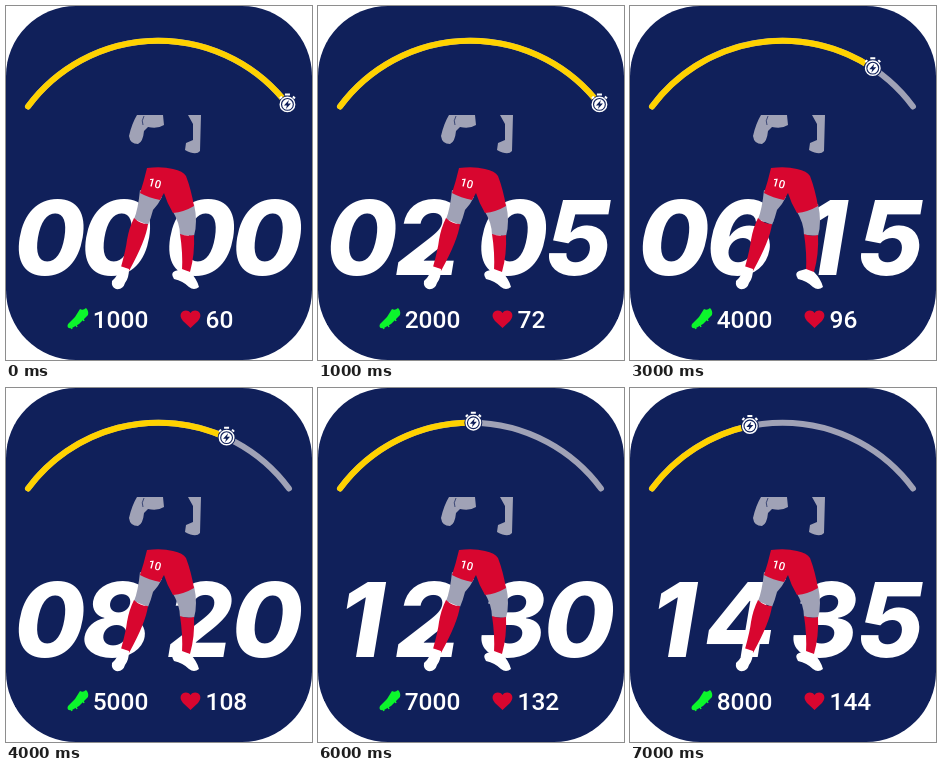
An HTML page for the animation above (8000 ms loop, 306x354 px).

```html
<!DOCTYPE html>
<html>
<head>
<meta charset="utf-8">
<style>
html, body { margin: 0; width: 100%; height: 100%; overflow: hidden; background: #fff; }
svg { display: block; width: 306px; height: 354px; }
text { font-family: Roboto, sans-serif; fill: #fff; }
.time { font: italic 800 103px Inter, sans-serif; text-anchor: middle; }
.stat { font-size: 24.5px; font-weight: 500; }
.arc { fill: none; stroke-width: 6; stroke-linecap: round; }
.skin { fill: #a0a2b6; }
.kit { fill: #d8062f; }
</style>
</head>
<body>
<svg viewBox="0 0 306 354">
  <rect width="306" height="354" rx="70" fill="#10205a"/>

  <path id="track" class="arc" stroke="#a0a2b6"/>
  <path id="level" class="arc" stroke="#ffd200"/>
  <g id="marker">
    <circle r="9" fill="#10205a"/>
    <path d="M-2.500-10H2.500M-7.500-6L-5.500-8M7.500-6L5.500-8" stroke="#fff" stroke-width="2"/>
    <circle r="7.200" fill="#10205a" stroke="#fff" stroke-width="1.500"/>
    <circle r="5.300" fill="#fff"/>
    <path d="M1.500-4.500L-3.500 1H-.5L-1.500 4.500L3.500-1H.5Z" fill="#10205a"/>
  </g>

  <g id="digits">
    <text class="time" x="43.5" y="269"/>
    <text class="time" x="110" y="269"/>
    <text class="time" x="194" y="269"/>
    <text class="time" x="261" y="269"/>
  </g>

  <g id="player">
    <path class="skin" d="M131 109H157L158 119Q152 123 142 121L138 125Q137 136 132 138Q124 138 123 130Q126 117 131 109Z"/>
    <path d="M138 110Q135 115 137 119" fill="none" stroke="#10205a" stroke-width=".7"/>
    <path class="skin" d="M182 109H195L194 145Q190 150 179 144L180 137L187 134V118Z"/>
    <path class="skin" d="M134 184L156 191Q152 199 147 204Q145 212 142 219L128 213Q132 204 134 184Z"/>
    <path class="skin" d="M166 204L188 198Q192 216 188 230L174 229Q174 217 166 204Z"/>
    <path class="kit" d="M128 212Q134 218 142 218Q140 234 123 265L115 261Q120 243 121 234Q123 222 128 212Z"/>
    <path class="kit" d="M174 228Q181 231 188 229Q189 248 184 266L176 265Q177 247 174 228Z"/>
    <path fill="#fff" d="M114 260L123 263Q123 272 119 277Q117 284 110 283Q105 281 106 275Q113 269 114 260Z"/>
    <path fill="#fff" d="M176 263L184 266Q191 273 193 281Q188 285 183 281Q177 275 168 273Q164 267 169 265Z"/>
    <path class="kit" d="M141 162Q156 160 167 163Q177 165 180 170Q185 183 188 200Q178 206 167 207Q161 197 158 187L154 194Q143 192 134 187Q138 175 141 162Z"/>
    <text x="141.5" y="179.5" font-size="11.5" font-weight="500" transform="rotate(15 141.5 179.5)">10</text>
  </g>

  <path fill="#0cf52c" d="M74 303Q77 305 80 302Q83 305 82 309L73 318L66 322Q60 323 62 318L69 311Z"/>
  <path d="M65 321L66 323M70 319L71 321M77 313L78 315" stroke="#0cf52c" stroke-width="1.500"/>
  <path class="kit" d="M184.500 322L177 315C170 307 180 301 184.500 307C189 301 199 307 192 315Z"/>
  <text id="steps" class="stat" x="114.5" y="322" text-anchor="middle"/>
  <text id="pulse" class="stat" x="199.5" y="322"/>
</svg>
<script>
const $ = id => document.getElementById(id);
const digits = $('digits').children;
const R = 162.3, CX = 152.5, CY = 197, EDGE = 53.5;
const markerAngles = [52.6, 52.6, 42.4, 33.8, 24.8, 13.6, 1, -11.6];

const onArc = deg => {
  const a = deg * Math.PI / 180;
  return [CX + R * Math.sin(a), CY - R * Math.cos(a)];
};
const arcTo = deg => `M${onArc(-EDGE)}A${R} ${R} 0 0 1 ${onArc(deg)}`;
const pad = n => String(n).padStart(2, '0');

$('track').setAttribute('d', arcTo(EDGE));

function draw(now) {
  const step = Math.floor(now / 1000) % 8;
  const time = pad(step * 2) + pad(step * 5);
  [...time].forEach((c, i) => digits[i].textContent = c);
  $('steps').textContent = 1000 * (step + 1);
  $('pulse').textContent = 60 + 12 * step;
  $('level').setAttribute('d', arcTo(markerAngles[step]));
  $('marker').setAttribute('transform', `translate(${onArc(markerAngles[step])})`);
  requestAnimationFrame(draw);
}
draw(performance.now());
</script>
</body>
</html>
```
